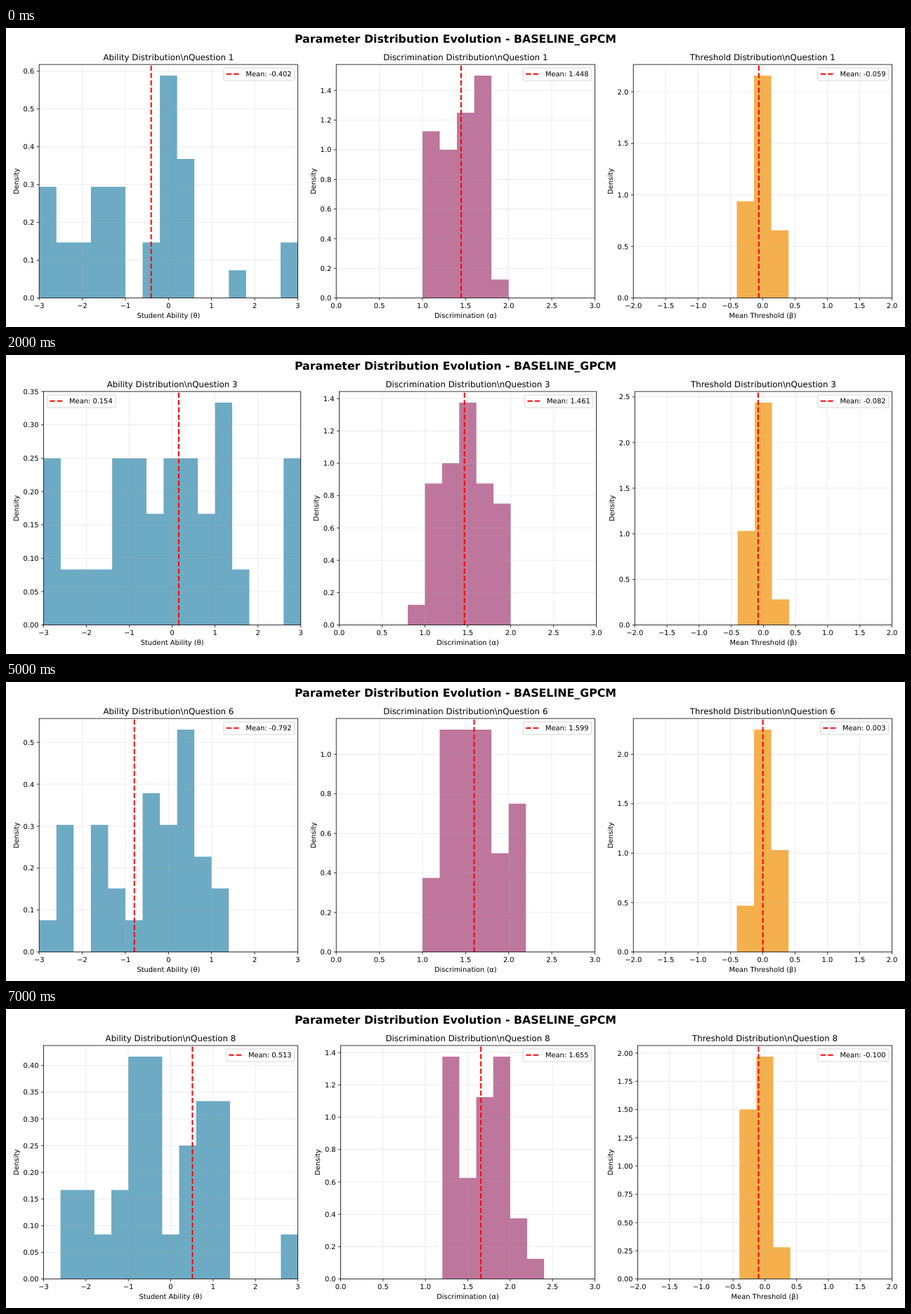
These frames come from a looping animation (1280x427 px, 8000 ms). An HTML page with a canvas:

```html
<!DOCTYPE html>
<html lang="en">
<head>
<meta charset="utf-8">
<title>Parameter Distribution Evolution</title>
<style>
html, body { margin: 0; width: 100%; height: 100%; overflow: hidden; background: #fff; }
canvas { display: block; }
</style>
</head>
<body>
<canvas id="stage" width="1280" height="427"></canvas>
<script>
const ctx = document.getElementById('stage').getContext('2d');
const STEP_MS = 1000, QUESTIONS = 8;
const TOP = 52.1, BOTTOM = 385.6, RIGHT = 1261.5;
const EM = 9.88, HAIR = 0.79, TICK = 3.46, LABEL_GAP = 6.9;
const DIGIT = 0.636 * EM;
const DASH = [7.31, 3.16];
const BINS = 15;

// Each histogram holds its first bin, then the count in each following bin.
const panels = [
  {
    title: 'Ability', label: 'Student Ability (θ)', color: '#6daac4',
    min: -3, max: 3, tick: 1, decimals: 0,
    means: [-0.402, -0.287, 0.154, -0.461, 0.912, -0.792, -0.14, 0.513],
    counts: [
      [0, 4, 2, 2, 4, 4, 0, 2, 8, 5, 0, 0, 1, 0, 0, 2],
      [0, 3, 1, 2, 2, 1, 3, 4, 7, 3, 2, 1, 1, 0, 1, 1],
      [0, 3, 1, 1, 1, 3, 3, 2, 3, 3, 2, 4, 1, 0, 0, 3],
      [0, 2, 2, 2, 2, 1, 2, 3, 2, 1, 8, 2, 2, 1, 1],
      [0, 2, 1, 2, 4, 0, 4, 1, 3, 1, 0, 3, 2, 3, 0, 1],
      [0, 1, 4, 0, 4, 2, 1, 5, 4, 7, 3, 2],
      [0, 1, 3, 1, 3, 2, 3, 6, 4, 5, 2, 1, 1],
      [1, 2, 2, 1, 2, 5, 5, 1, 3, 4, 4, 0, 0, 0, 1]
    ]
  },
  {
    title: 'Discrimination', label: 'Discrimination (α)', color: '#be769c',
    min: 0, max: 3, tick: 0.5, decimals: 1,
    means: [1.448, 1.452, 1.461, 1.597, 1.559, 1.599, 1.621, 1.655],
    counts: [
      [5, 9, 8, 10, 12, 1],
      [5, 8, 8, 11, 10, 3],
      [4, 1, 7, 8, 11, 7, 6],
      [5, 5, 6, 9, 5, 12, 3],
      [5, 4, 11, 6, 11, 6, 1, 1],
      [5, 3, 9, 9, 9, 4, 6],
      [5, 2, 9, 8, 10, 7, 4],
      [6, 11, 5, 9, 11, 3, 1]
    ]
  },
  {
    title: 'Threshold', label: 'Mean Threshold (β)', color: '#f5b04d',
    min: -2, max: 2, tick: 0.5, decimals: 1,
    means: [-0.059, -0.071, -0.082, -0.055, -0.094, 0.003, -0.052, -0.1],
    counts: [
      [6, 10, 23, 7], [6, 10, 26, 4], [6, 11, 26, 3], [6, 11, 23, 6],
      [6, 15, 23, 2], [6, 5, 24, 11], [6, 12, 23, 5], [6, 16, 21, 3]
    ]
  }
];

function text(str, x, y, align = 'center', size = EM, weight = '') {
  ctx.font = `${weight} ${size}px "DejaVu Sans", sans-serif`;
  ctx.textAlign = align;
  ctx.fillStyle = '#000';
  ctx.fillText(str, x, y);
}

function line(x1, y1, x2, y2, color = '#000', width = HAIR, dash = []) {
  ctx.strokeStyle = color;
  ctx.lineWidth = width;
  ctx.setLineDash(dash);
  ctx.beginPath();
  ctx.moveTo(x1, y1);
  ctx.lineTo(x2, y2);
  ctx.stroke();
  ctx.setLineDash([]);
}

function ticks(min, max, step) {
  const values = [];
  for (let i = 0; min + i * step <= max + 1e-9; i++) values.push(min + i * step);
  return values;
}

const format = (v, decimals) => v.toFixed(decimals).replace('-', '−');

// Densities, axis limit and tick step of one histogram.
function histogram(panel, q) {
  const [first, ...counts] = panel.counts[q];
  const binWidth = (panel.max - panel.min) / BINS;
  const total = counts.reduce((a, b) => a + b, 0);
  const heights = counts.map(n => n / (total * binWidth));
  const yMax = Math.max(...heights) * 1.05;
  const yStep = [0.05, 0.1, 0.2, 0.25, 0.5].find(s => yMax / s < 9);
  const decimals = yStep === 0.05 || yStep === 0.25 ? 2 : 1;
  return { start: panel.min + first * binWidth, binWidth, heights, yMax, yStep, decimals };
}

function drawLegend(mean, left, right, atLeft) {
  const label = 'Mean: ' + mean.toFixed(3);
  ctx.font = `${EM}px "DejaVu Sans", sans-serif`;
  const width = ctx.measureText(label).width + EM * 3.6;
  const x = atLeft ? left + EM / 2 : right - EM / 2 - width;
  ctx.beginPath();
  ctx.roundRect(x, TOP + EM / 2, width, 18, 2);
  ctx.fillStyle = 'rgba(255,255,255,0.8)';
  ctx.fill();
  ctx.strokeStyle = 'rgba(204,204,204,0.8)';
  ctx.lineWidth = 0.99;
  ctx.stroke();
  const handle = x + 0.4 * EM;
  line(handle, 65.7, handle + 2 * EM, 65.7, '#f00', 1.98, DASH);
  text(label, handle + 2.8 * EM, 69.1, 'left');
}

function drawPanel(panel, hist, q, left, width) {
  const right = left + width, middle = left + width / 2;
  const px = v => left + (v - panel.min) / (panel.max - panel.min) * width;
  const py = v => BOTTOM - v / hist.yMax * (BOTTOM - TOP);
  const xTicks = ticks(panel.min, panel.max, panel.tick);
  const yTicks = ticks(0, hist.yMax, hist.yStep);
  const mean = panel.means[q];

  ctx.fillStyle = panel.color;
  ctx.beginPath();
  ctx.moveTo(px(hist.start), BOTTOM);
  hist.heights.forEach((h, i) => {
    const x = hist.start + i * hist.binWidth;
    ctx.lineTo(px(x), py(h));
    ctx.lineTo(px(x + hist.binWidth), py(h));
  });
  ctx.lineTo(px(hist.start + hist.heights.length * hist.binWidth), BOTTOM);
  ctx.fill();

  const grid = 'rgba(176,176,176,0.3)';
  for (const v of xTicks) {
    line(px(v), TOP, px(v), BOTTOM, grid);
    line(px(v), BOTTOM, px(v), BOTTOM + TICK);
    text(format(v, panel.decimals), px(v), 399.9);
  }
  for (const v of yTicks) {
    line(left, py(v), right, py(v), grid);
    line(left - TICK, py(v), left, py(v));
    text(format(v, hist.decimals), left - LABEL_GAP, py(v) + 3.6, 'right');
  }

  line(px(mean), BOTTOM, px(mean), TOP, '#f00', 1.98, DASH);
  ctx.strokeStyle = '#000';
  ctx.lineWidth = HAIR;
  ctx.strokeRect(left, TOP, width, BOTTOM - TOP);

  text(`${panel.title} Distribution\\nQuestion ${q + 1}`, middle, 46.1, 'center', 11.85);
  text(panel.label, middle, 413.9);
  ctx.save();
  ctx.translate(left - 29 - (hist.decimals - 1) * DIGIT, (TOP + BOTTOM) / 2);
  ctx.rotate(-Math.PI / 2);
  text('Density', 0, 0);
  ctx.restore();

  drawLegend(mean, left, right, panel === panels[0] && q === 2);
}

function draw(q) {
  ctx.fillStyle = '#fff';
  ctx.fillRect(0, 0, 1280, 427);
  ctx.textRendering = 'geometricPrecision';
  text('Parameter Distribution Evolution - BASELINE_GPCM', 640, 20.5, 'center', 15.8, 'bold');

  // Longer tick labels push the axes apart; all three stay equally wide.
  const hists = panels.map(p => histogram(p, q));
  const extra = hists.map(h => (h.decimals - 1) * DIGIT);
  const left = 47.2 + extra[0];
  const gap = 54.7 + Math.max(extra[1], extra[2]);
  const width = (RIGHT - left - 2 * gap) / 3;
  panels.forEach((p, i) => drawPanel(p, hists[i], q, left + i * (width + gap), width));
}

let start, shown = -1;
function tick(now) {
  start ??= now;
  const q = Math.floor((now - start) / STEP_MS) % QUESTIONS;
  if (q !== shown) draw(shown = q);
  requestAnimationFrame(tick);
}
requestAnimationFrame(tick);
</script>
</body>
</html>
```
